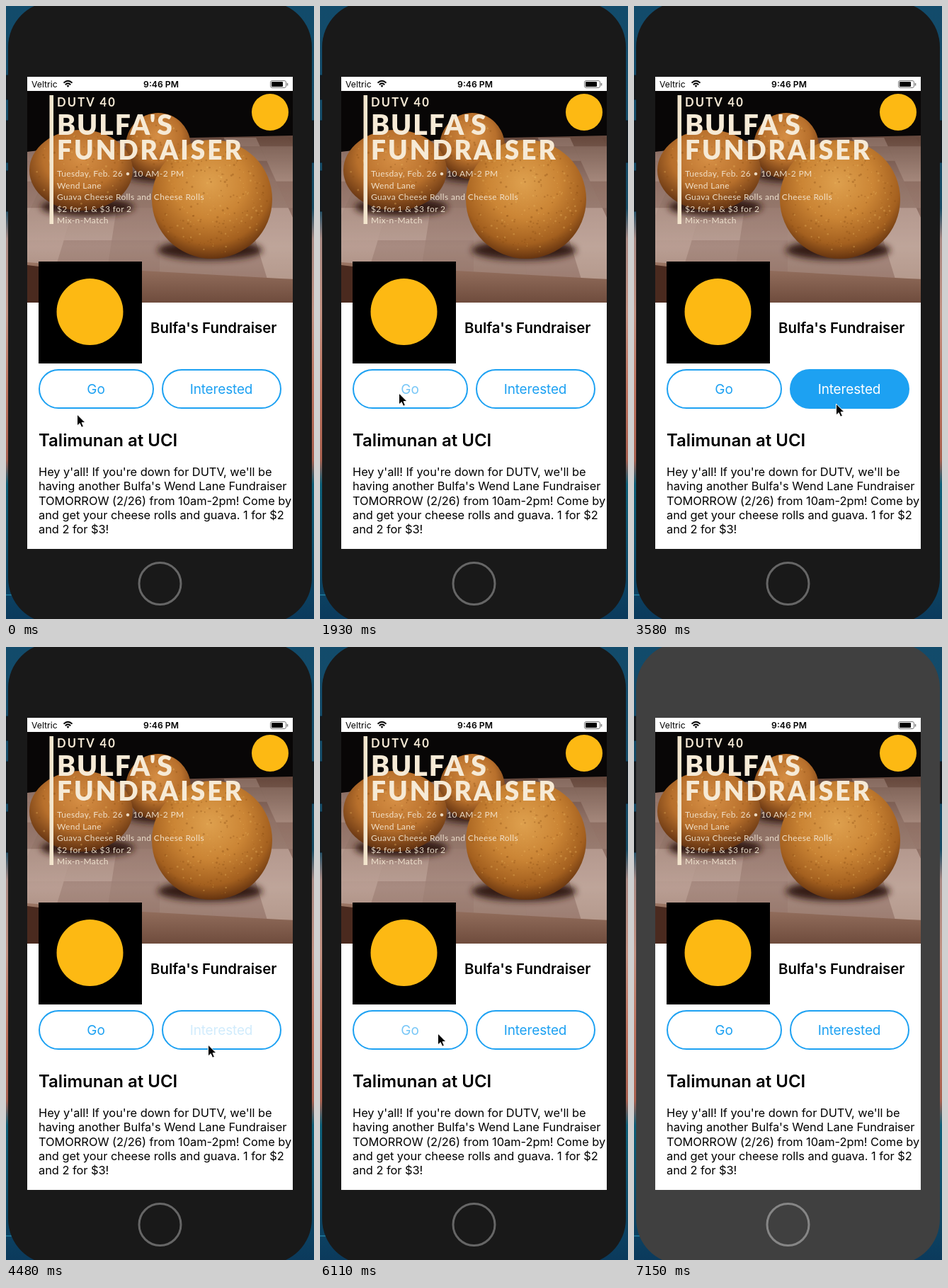
Animation, 435 px wide and 866 px high, one loop 7250 ms. Source, as an HTML page:

```html
<!DOCTYPE html>
<html lang="en">
<head>
<meta charset="utf-8">
<title>Event page</title>
<style>
  html, body { margin: 0; width: 100%; height: 100%; overflow: hidden; background: #0d4360; }
  svg { display: block; width: 435px; height: 866px; }
  text { font-family: Inter, "Open Sans", sans-serif; white-space: pre; }
  .poster text { font-family: Lato, "Open Sans", sans-serif; fill: #f6ead6; }
  .poster .big { font-weight: 900; }
  .poster .info { font-size: 12px; letter-spacing: .36px; opacity: .9; }
  .body { font-size: 16.4px; letter-spacing: -.03px; }
  .label { font-size: 19px; letter-spacing: -.15px; text-anchor: middle; }
  .pill { stroke: #1da1f2; stroke-width: 2; }
</style>
</head>
<body>
<svg viewBox="0 0 435 866">
  <defs>
    <linearGradient id="wall" x2="0" y2="1">
      <stop offset="0" stop-color="#124b6b"/>
      <stop offset=".33" stop-color="#164a63"/>
      <stop offset=".38" stop-color="#a98a84"/>
      <stop offset=".5" stop-color="#c29182"/>
      <stop offset=".62" stop-color="#bd7460"/>
      <stop offset=".74" stop-color="#a8604f"/>
      <stop offset=".78" stop-color="#0e5f78"/>
      <stop offset="1" stop-color="#0b3a5c"/>
    </linearGradient>
    <linearGradient id="table" x2="0" y2="1">
      <stop offset="0" stop-color="#65483d"/>
      <stop offset=".3" stop-color="#997b6f"/>
      <stop offset=".75" stop-color="#b59a8f"/>
      <stop offset="1" stop-color="#a5877a"/>
    </linearGradient>
    <radialGradient id="crust" cx=".48" cy=".36" r=".66">
      <stop offset="0" stop-color="#dea04e"/>
      <stop offset=".45" stop-color="#cb8535"/>
      <stop offset=".78" stop-color="#a4601f"/>
      <stop offset="1" stop-color="#5c2d0d"/>
    </radialGradient>
    <radialGradient id="dim" cx=".5" cy=".36" r=".66">
      <stop offset="0" stop-color="#d68f45"/>
      <stop offset=".55" stop-color="#b8702c"/>
      <stop offset="1" stop-color="#5a2c0e"/>
    </radialGradient>
    <linearGradient id="lip" x2="0" y2="1">
      <stop offset="0" stop-color="#9a7563"/>
      <stop offset="1" stop-color="#6f4c3d"/>
    </linearGradient>
    <filter id="soft" x="-20%" y="-20%" width="140%" height="140%"><feGaussianBlur stdDeviation="5"/></filter>
    <clipPath id="photo"><rect x="30" y="120" width="375" height="299"/></clipPath>
    <clipPath id="board"><path d="M30 206L180 188 405 183V392L30 366Z"/></clipPath>
  </defs>

  <rect width="435" height="866" fill="url(#wall)"/>
  <path d="M0 832H14" stroke="#1c6f91" stroke-width="2"/>
  <path d="M0 98H8V132H0ZM0 162H8V221H0ZM0 233H8V290H0ZM428 162H435V221H428Z" fill="#17191b" stroke="#071923"/>
  <rect id="bezel" x="3" y="-6" width="429" height="878" rx="64" fill="#191919"/>
  <circle id="home" cx="217.5" cy="816" r="29.5" fill="none" stroke="#666" stroke-width="3"/>
  <rect x="30" y="100" width="375" height="667" fill="#fff"/>

  <text x="36" y="115" font-size="12.2">Veltric</text>
  <g fill="none" stroke="#000" stroke-width="2">
    <path d="M81.5 108.6Q87.5 102.8 93.5 108.6M83.8 111.2Q87.5 107.6 91.2 111.2"/>
    <path d="M85.7 112.4L87.5 115 89.3 112.4Q87.5 111 85.7 112.4Z" fill="#000" stroke="none"/>
  </g>
  <text x="219" y="115" font-size="12.2" font-weight="600" text-anchor="middle">9:46 PM</text>
  <rect x="373.5" y="105.5" width="22" height="10" rx="2.5" fill="none" stroke="#777"/>
  <rect x="375" y="107" width="16" height="7" rx="1" fill="#000"/>
  <path d="M397.5 109V112.5" stroke="#777" stroke-width="1.5"/>

  <g class="poster" clip-path="url(#photo)">
    <rect x="30" y="120" width="375" height="299" fill="#080606"/>
    <path d="M30 206L180 188 405 183V392L30 366Z" fill="url(#table)"/>
    <g id="grain" clip-path="url(#board)"></g>
    <path d="M30 362L192 374 405 386V419H30Z" fill="url(#lip)"/>
    <path d="M30 366L192 386V419H30Z" fill="#4a2a1f"/>
    <g filter="url(#soft)" fill="#361b12">
      <ellipse cx="115" cy="284" rx="66" ry="13"/>
      <ellipse cx="288" cy="345" rx="74" ry="14"/>
      <ellipse cx="215" cy="240" rx="45" ry="9"/>
    </g>
    <ellipse cx="215" cy="198" rx="46" ry="47" fill="url(#dim)"/>
    <ellipse cx="106" cy="232" rx="73" ry="57" fill="url(#dim)"/>
    <ellipse cx="291" cy="273" rx="85" ry="84" fill="url(#crust)"/>
    <g id="crumbs"></g>

    <rect x="61.5" y="126" width="5.5" height="182" fill="#f3e5cd"/>
    <text x="72" y="142" font-size="16.5" font-weight="700" letter-spacing="2.2">DUTV 40</text>
    <text class="big" x="72" y="182" font-size="39" letter-spacing="2">BULFA'S</text>
    <text class="big" x="72" y="217" font-size="37" letter-spacing="3">FUNDRAISER</text>
    <g id="info"></g>
    <circle cx="373" cy="150" r="26" fill="#fdb913"/>
  </g>

  <rect x="46" y="361" width="146" height="144"/>
  <circle cx="118.5" cy="432" r="47" fill="#fdb913"/>
  <text x="204" y="462" font-size="20.4" font-weight="600">Bulfa's Fundraiser</text>

  <g id="go">
    <rect class="pill" x="47" y="514" width="161" height="54" rx="27"/>
    <text class="label" x="127" y="548">Go</text>
  </g>
  <g id="interested">
    <rect class="pill" x="221" y="514" width="167" height="54" rx="27"/>
    <text class="label" x="304" y="548">Interested</text>
  </g>

  <text x="46" y="622" font-size="24" font-weight="600">Talimunan at UCI</text>
  <g id="story"></g>

  <path id="cursor" d="M0 0V16L3.7 12.6 6.2 18.3 8.9 17.1 6.5 11.6H11.5Z" stroke="#fff" stroke-linejoin="round"/>
</svg>
<script>
const $ = id => document.getElementById(id);
const LOOP = 7250, BLUE = '#1da1f2';

function add(parent, tag, attrs, text = '') {
  const el = document.createElementNS('http://www.w3.org/2000/svg', tag);
  for (const k in attrs) el.setAttribute(k, attrs[k]);
  el.textContent = text;
  $(parent).append(el);
}

function addLines(parent, cls, x, y, step, lines) {
  lines.forEach((line, i) => add(parent, 'text', { class: cls, x, y: y + i * step }, line));
}

addLines('info', 'info', 72, 241, 16.6, [
  'Tuesday, Feb. 26 • 10 AM-2 PM', 'Wend Lane',
  'Guava Cheese Rolls and Cheese Rolls', '$2 for 1 & $3 for 2', 'Mix-n-Match'
]);
addLines('story', 'body', 46, 664, 20.3, [
  "Hey y'all! If you're down for DUTV, we'll be",
  "having another Bulfa's Wend Lane Fundraiser",
  'TOMORROW (2/26) from 10am-2pm! Come by',
  'and get your cheese rolls and guava. 1 for $2',
  'and 2 for $3!'
]);

let seed = 7;
const rand = () => (seed = seed * 16807 % 2147483647) / 2147483647;

// Wooden blocks in perspective
const seamX = (col, y) => 217 + (col - 5) * 46 * (1 + (y - 190) / 300);
const rowY = row => 186 + 8 * row + 4.2 * row * row;
for (let row = 0; row < 6; row++) {
  const top = rowY(row), low = rowY(row + 1);
  for (let col = 0; col < 10; col++) {
    add('grain', 'path', {
      d: `M${seamX(col, top)} ${top}H${seamX(col + 1, top)}L${seamX(col + 1, low)} ${low}H${seamX(col, low)}Z`,
      fill: rand() < .5 ? '#d2bab0' : '#5f3d32', opacity: .1 + rand() * .25
    });
  }
}

// Speckled crust
for (const [cx, cy, rx, ry, n] of [[106, 232, 67, 51, 110], [215, 198, 41, 41, 50], [291, 273, 79, 78, 260]]) {
  for (let i = 0; i < n; i++) {
    const a = rand() * Math.PI * 2, d = Math.sqrt(rand());
    const x = cx + Math.cos(a) * d * rx, y = cy + Math.sin(a) * d * ry;
    add('crumbs', 'circle', {
      cx: x, cy: y, r: .6 + rand(), fill: rand() < .5 ? '#e8b45f' : '#8a4c15', opacity: .35
    });
  }
}

// Button looks: [pill fill, label colour, label opacity]
const LOOKS = {
  idle: ['#fff', BLUE, 1],
  press: ['#fff', BLUE, .2],
  rise: ['#fff', BLUE, .6],
  fill: [BLUE, '#fff', 0],
  fillRise: [BLUE, '#fff', .5],
  on: [BLUE, '#fff', 1],
  onPress: [BLUE, '#fff', .2]
};

// [ms, cursor x, cursor y, go, interested]
const STEPS = [
  [0, 100.5, 577, 'idle', 'idle'],
  [150, 102, 570, 'idle', 'idle'],
  [300, 105, 560, 'idle', 'idle'],
  [450, 109, 551, 'idle', 'idle'],
  [600, 111.5, 547, 'idle', 'idle'],
  [750, 111.5, 547, 'press', 'idle'],
  [890, 111.5, 547, 'fill', 'idle'],
  [1190, 111.5, 547, 'fillRise', 'idle'],
  [1340, 111.5, 547, 'on', 'idle'],
  [1640, 111.5, 547, 'onPress', 'idle'],
  [1790, 111.5, 547, 'press', 'idle'],
  [1930, 111.5, 547, 'rise', 'idle'],
  [2080, 112, 552, 'idle', 'idle'],
  [2230, 115.5, 570, 'idle', 'idle'],
  [2380, 128, 602, 'idle', 'idle'],
  [2530, 175, 627, 'idle', 'idle'],
  [2680, 238, 614, 'idle', 'idle'],
  [2830, 275, 582, 'idle', 'idle'],
  [2980, 285.5, 562, 'idle', 'idle'],
  [3130, 285.5, 562, 'idle', 'press'],
  [3280, 285.5, 562, 'idle', 'fill'],
  [3430, 285.5, 562, 'idle', 'fillRise'],
  [3580, 285.5, 562, 'idle', 'on'],
  [4480, 285.5, 562, 'idle', 'press'],
  [4630, 285.5, 562, 'idle', 'rise'],
  [4930, 285.5, 562, 'idle', 'idle'],
  [5230, 262, 557, 'idle', 'idle'],
  [5380, 200, 548, 'idle', 'idle'],
  [5520, 166.5, 546, 'idle', 'idle'],
  [5670, 166.5, 546, 'fill', 'idle'],
  [5960, 166.5, 546, 'press', 'idle'],
  [6110, 166.5, 546, 'rise', 'idle'],
  [6260, 182, 562, 'idle', 'idle'],
  [6400, 240, 640, 'idle', 'idle'],
  [6550, 325, 755, 'idle', 'idle'],
  [6700, 390, 850, 'idle', 'idle'],
  [6840, 450, 900, 'idle', 'idle']
];

function paint(id, look) {
  const [fill, color, opacity] = LOOKS[look];
  const [pill, label] = $(id).children;
  pill.setAttribute('fill', fill);
  label.setAttribute('fill', color);
  label.setAttribute('opacity', opacity);
}

function draw() {
  const t = performance.now() % LOOP;
  const [, x, y, go, interested] = STEPS.findLast(s => s[0] <= t);
  const flash = t >= 7150;
  $('cursor').setAttribute('transform', `translate(${x} ${y})`);
  paint('go', go);
  paint('interested', interested);
  $('bezel').setAttribute('fill', flash ? '#404040' : '#191919');
  $('home').setAttribute('stroke', flash ? '#868686' : '#666');
  requestAnimationFrame(draw);
}
draw();
</script>
</body>
</html>
```
